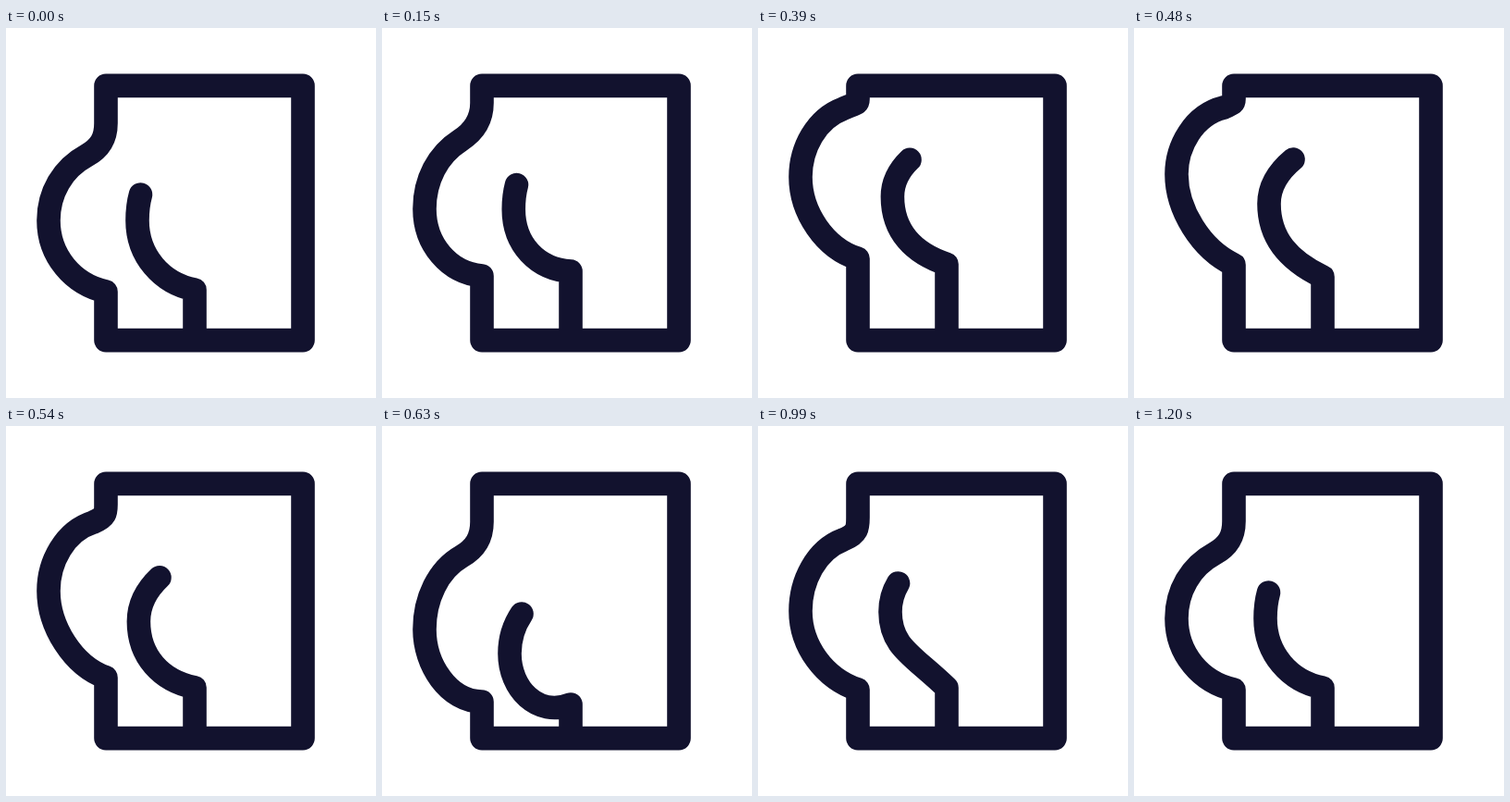
An HTML page that plays this animation: 400x400 px, repeating every 3230 ms.

```html
<!DOCTYPE html>
<html lang="en">
<head>
<meta charset="utf-8">
<title>Body outline</title>
<style>
  html, body { margin: 0; width: 100%; height: 100%; overflow: hidden; background: #fff; }
  svg { display: block; width: 100%; height: 100%; }
  path { fill: none; stroke: #12122e; stroke-width: 25.6; stroke-linecap: round; stroke-linejoin: round; }
</style>
</head>
<body>
<svg viewBox="0 0 400 400"><path id="body"/></svg>
<script>
const LOOP = 3230, STEP = 30, END = 1200;
const TOP = 62.4, BOTTOM = 337.6, LEFT = 108, RIGHT = 321, MIDDLE = 204, FRONT = 46;

// Outer: shoulder x y, front y, sag, end. Inner: tip x y, front x y, sag, end.
const rest = { t: 0, p: [87, 138, 208, 277, 285, 145.5, 180, 142, 208, 276, 283] };
const keys = [
  rest,
  { t: 270, p: [84, 103, 180, 251, 252, 149, 157, 143, 185, 247, 247] },
  { t: 480, p: [97, 86, 158, 239, 256, 172, 142, 146, 190, 252, 269] },
  { t: 630, p: [86, 141, 220, 298, 298, 151, 203, 138, 246, 315, 301] },
  { t: 810, p: [75, 167, 250, 324, 294, 144.5, 197, 134, 238, 308, 286] },
  { t: 990, p: [92, 123, 200, 273, 285, 151.5, 170, 143, 201, 248, 283] },
  { t: END, p: rest.p }
];

// Velocity through a key, at rest at both ends
function slope(i, k) {
  const a = keys[i - 1], b = keys[i + 1];
  return a && b ? (b.p[k] - a.p[k]) / (b.t - a.t) : 0;
}

function poseAt(t) {
  if (t >= END) return rest.p;
  const i = keys.findIndex(key => key.t > t) - 1;
  const a = keys[i], b = keys[i + 1], span = b.t - a.t;
  const u = (t - a.t) / span, v = 1 - u;
  return a.p.map((from, k) =>
    v * v * ((1 + 2 * u) * from + u * span * slope(i, k)) +
    u * u * ((1 + 2 * v) * b.p[k] - v * span * slope(i + 1, k)));
}

// From the foremost point round to the vertical line at endX
const lobe = (x, y, sag, endX, end) =>
  `${x} ${y}C${x} ${y + 38} ${endX - 36} ${sag} ${endX} ${end}V${BOTTOM}`;

function outline([x, y, frontY, sag, end, tipX, tipY, inX, inY, inSag, inEnd]) {
  // The further back the shoulder, the flatter its slope and the shorter its neck
  const back = x - 87;
  const dx = 0.65 * back + 26, dy = 14 - 0.6 * back;
  const neck = Math.max(77, y - 35 + 2.2 * back);
  const outer = `M${LEFT} ${TOP}V${neck}` +
    `C${LEFT} ${neck + 0.45 * (y - neck)} ${Math.min(LEFT, x + 0.6 * dx)} ${y - 0.6 * dy} ${x} ${y}` +
    `C${x - dx} ${y + dy} ${FRONT} ${frontY - 0.42 * (frontY - y)} ` +
    lobe(FRONT, frontY, sag, LEFT, end) + `H${RIGHT}V${TOP}Z`;
  const inner = `M${tipX} ${tipY}Q${inX} ${inY - 0.55 * (inY - tipY)} ` +
    lobe(inX, inY, inSag, MIDDLE, inEnd);
  return outer + inner;
}

const path = document.getElementById('body');
const start = performance.now();

function draw() {
  const t = (performance.now() - start) % LOOP;
  path.setAttribute('d', outline(poseAt(Math.floor(t / STEP) * STEP)));
  requestAnimationFrame(draw);
}
draw();
</script>
</body>
</html>
```
